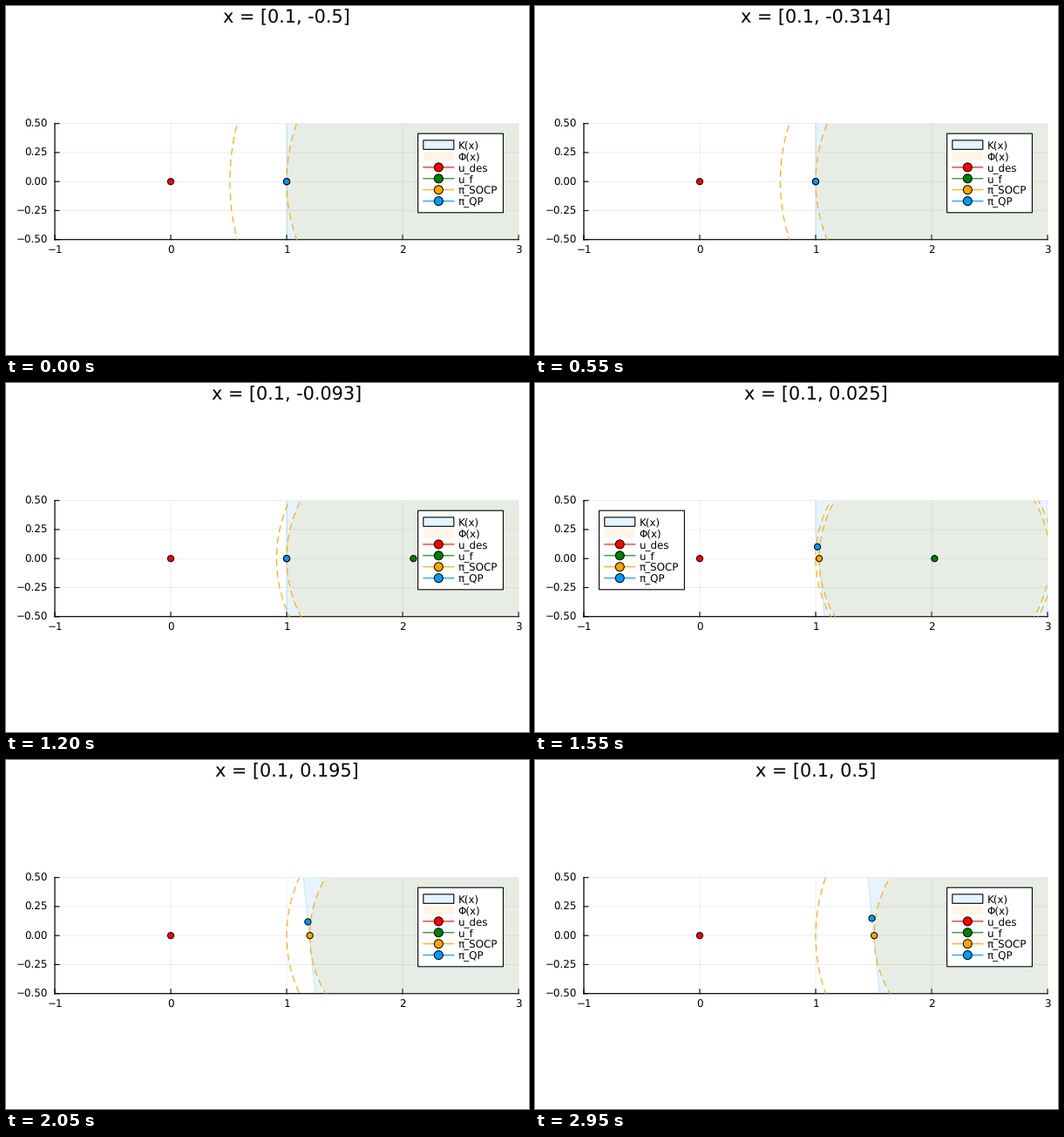
Write a matplotlib script that moves like this. It is 600 px wide and 400 px high and loops after 3000 ms.

```python
import math

import matplotlib.pyplot as plt
from matplotlib.animation import FuncAnimation
from matplotlib.patches import Circle, Ellipse, Polygon, Rectangle

W, H, DPI = 600, 400, 100
FRAMES, STEP_MS = 60, 50
PT = 72 / DPI            # points per pixel
UNIT = 133               # pixels per data unit
X1 = 0.1
BLUE, ORANGE = "#009af9", "orange"

plt.rcParams["font.family"] = "DejaVu Sans"
plt.rcParams["text.hinting"] = "none"
plt.rcParams["path.snap"] = False
fig = plt.figure(figsize=(W / DPI, H / DPI), dpi=DPI, facecolor="white")
ax = fig.add_axes([0, 0, 1, 1])
ax.set_xlim(0, W)
ax.set_ylim(H, 0)
ax.axis("off")


def px(u):
    return 189 + UNIT * u


def py(v):
    return 201.2 - UNIT * v


LEFT, RIGHT, TOP, BOTTOM = px(-1), px(3), py(0.5), py(-0.5)
window = Rectangle((LEFT, TOP), RIGHT - LEFT, BOTTOM - TOP, transform=ax.transData)


def line(xs, ys, color="black", width=1.1, z=2, **kw):
    return ax.plot(xs, ys, color=color, lw=width * PT, zorder=z, **kw)[0]


def text(x, y, s, size=11.9, z=2, **kw):
    return ax.text(x, y, s, fontsize=size * PT, va="baseline", zorder=z, **kw)


def dot(x, y, color, radius, z):
    return ax.add_patch(Circle((x, y), radius, fc=color, ec="black", lw=PT, zorder=z))


def box(x, y, w, h, z, **kw):
    return ax.add_patch(Rectangle((x, y), w, h, zorder=z, **kw))


def clipped(shape):
    ax.add_patch(shape)
    shape.set_clip_path(window)
    return shape


def ring():
    # turned so that the dashes start at the rightmost point
    return clipped(Ellipse((0, 0), 1, -1, angle=-90, fill=False, ec=ORANGE,
                           lw=1.1 * PT, ls=(0, (8 / 1.1, 5 / 1.1)),
                           capstyle="butt", zorder=4))


def draw_axes():
    for u in range(-1, 4):
        line([px(u)] * 2, [TOP, BOTTOM], width=0.7, z=1, alpha=0.1)
        line([px(u)] * 2, [BOTTOM, BOTTOM - 5])
        text(px(u), 283.4, str(u).replace("-", "\u2212"), ha="center")
    for k in range(-2, 3):
        v = k / 4
        line([LEFT, RIGHT], [py(v)] * 2, width=0.7, z=1, alpha=0.1)
        line([LEFT, LEFT + 5], [py(v)] * 2)
        text(48, py(v) + 4.3, f"{v:.2f}".replace("-", "\u2212"), ha="right")
    line([LEFT, LEFT], [TOP, BOTTOM], width=1.2)
    line([LEFT, RIGHT], [BOTTOM, BOTTOM], width=1.2)


def make_legend(x):
    frame = dict(ec="black", lw=PT * 1.1)
    parts = [box(x, 146.2, 97.8, 90.6, 10, fc="white", **frame)]
    labels = ["K(x)", "Φ(x)", "u_des", "u_f", "π_SOCP", "π_QP"]
    colors = [BLUE, ORANGE, "red", "green", ORANGE, BLUE]
    for row, (label, color) in enumerate(zip(labels, colors)):
        y = 159.1 + 12.9 * row
        if row < 2:
            parts.append(box(x + 6.2, y - 5.2, 35, 10.4, 11, fc=color, alpha=0.1, lw=0))
        else:
            parts.append(line([x + 6.2, x + 41.2], [y, y], color, z=11))
            parts.append(dot(x + 23.7, y, color, 5, 12))
        if row == 0:
            parts.append(box(x + 6.2, y - 5.2, 35, 10.4, 12, fill=False, **frame))
        parts.append(text(x + 46.2, y + 4.2, label, z=12))
    return parts


draw_axes()
legends = {"right": make_legend(472.6), "left": make_legend(73.6)}
title = text(322.3, 18.8, "", size=20.8, ha="center")

half_plane = clipped(Polygon([(0, 0), (1, 1), (1, 0)], fc=BLUE, alpha=0.1, lw=0, zorder=3))
border = line([], [], "#0068a8", 1, 3, alpha=0.15)
border.set_clip_path(window)
safe_disc = clipped(Circle((0, 0), 1, fc="#ffb000", alpha=0.1, lw=0, zorder=3.5))
rings = [ring(), ring()]

dot(px(0), py(0), "red", 3.6, 5)
u_f = dot(0, 0, "green", 3.6, 6)
socp = dot(0, 0, ORANGE, 3.6, 7)
qp = dot(0, 0, BLUE, 3.6, 8)


def nearest(x2):
    """Point closest to the origin with u >= 1 and u + X1*v >= 1 + x2."""
    scale = (1 + x2) / (1 + X1 ** 2)
    if scale >= 1:
        return scale, scale * X1
    return 1, max(0, x2 / X1)


def draw(i):
    x2 = -0.5 + i / (FRAMES - 1)
    title.set_text(f"x = [{X1}, {round(x2, 3)}]")

    corner = min(0.5, max(-0.5, x2 / X1))
    edge = [(px(max(1, 1 + x2 - X1 * v)), py(v)) for v in (0.5, corner, -0.5)]
    half_plane.set_xy(edge + [(RIGHT, BOTTOM), (RIGHT, TOP)])
    border.set_data(*zip(*edge))

    # concentric discs that touch each of the two constraints
    center = 2 + abs(x2)
    middle = (px(center), py(0))
    radii = [center - 1, (center - 1 - x2) / math.hypot(1, X1)]
    for circle, r in zip(rings, radii):
        circle.set_center(middle)
        circle.set_width(2 * UNIT * r)
        circle.set_height(-2 * UNIT * r)
    safe_disc.set_center(middle)
    safe_disc.set_radius(UNIT * min(radii))

    u, v = nearest(x2)
    u_f.set_center(middle)
    socp.set_center((px(center - min(radii)), py(0)))
    qp.set_center((px(u), py(v)))

    # the legend dodges the discs while they cross its corner
    side = "left" if -0.05 < x2 < 0.12 else "right"
    for name, parts in legends.items():
        for part in parts:
            part.set_visible(name == side)
    return []


anim = FuncAnimation(fig, draw, frames=FRAMES, interval=STEP_MS,
                     repeat=True, repeat_delay=0, blit=False)
plt.show()
```
